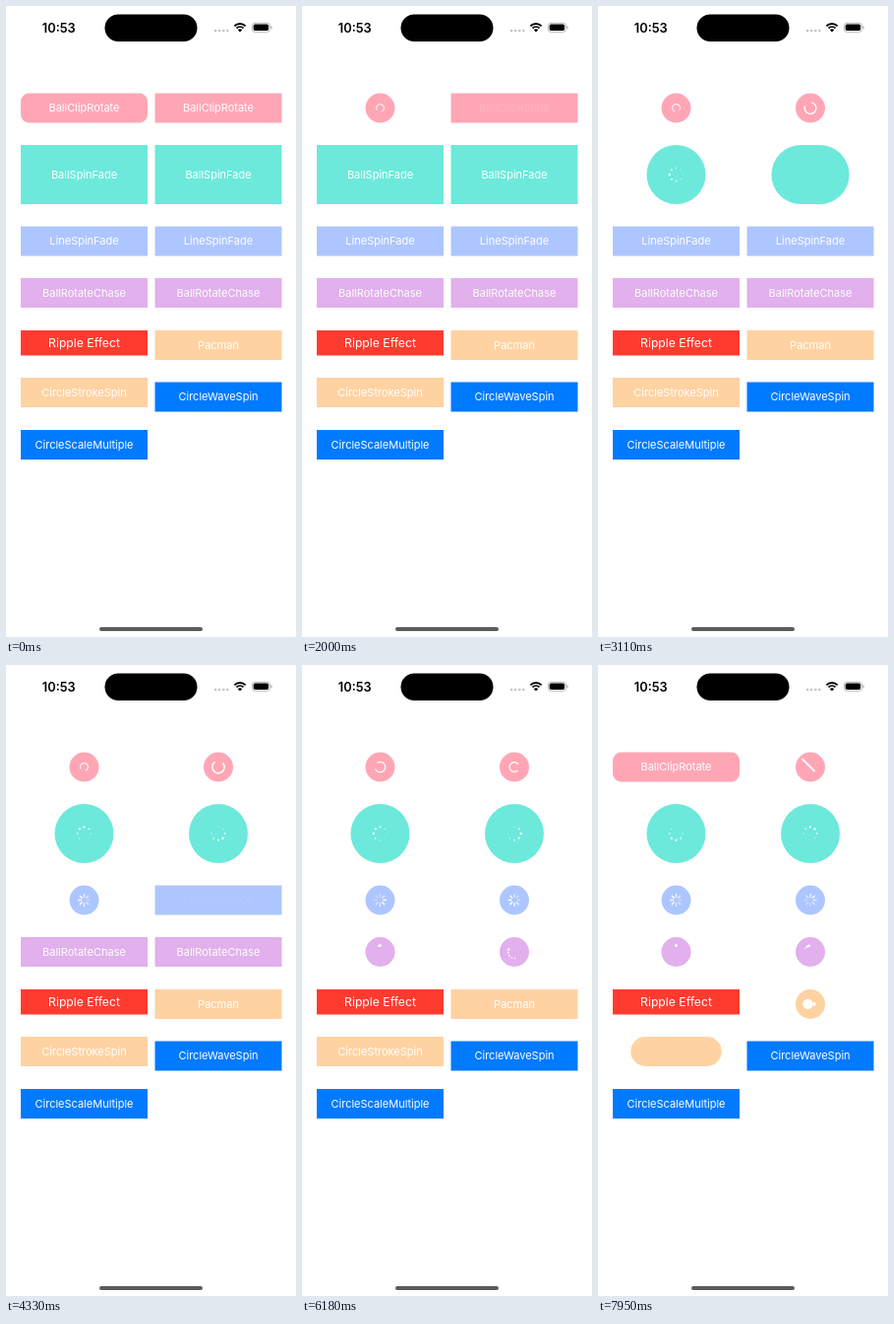
These frames come from a looping animation (295 by 640 pixels, 8000 ms). An HTML page with a canvas:

```html
<!DOCTYPE html>
<html lang="en">
<head>
<meta charset="utf-8">
<style>
html, body { margin: 0; width: 100%; height: 100%; overflow: hidden; background: #fff; }
canvas { display: block; width: 295px; height: 640px; }
</style>
</head>
<body>
<canvas id="stage"></canvas>
<script>
const W = 295, H = 640, LOOP = 8000;
const FIRST_CHANGE = 1450, STEP = 110.2;
const FADE = 100, SHRINK = 150;
const LEFT = 15, RIGHT = 151.5, BUTTON_W = 129;
const PINK = '#ffa6b5', TEAL = '#6ce9db', LILAC = '#adc6ff', PURPLE = '#e1b0ed';
const RED = '#ff3b30', PEACH = '#ffd2a2', BLUE = '#007aff';
const TAU = Math.PI * 2;

const canvas = document.getElementById('stage');
const ctx = canvas.getContext('2d');
const dpr = window.devicePixelRatio || 1;
canvas.width = W * dpr;
canvas.height = H * dpr;

const clamp = v => Math.max(0, Math.min(1, v));
const lerp = (a, b, k) => a + (b - a) * k;
const fract = v => v - Math.floor(v);
const smooth = k => k * k * (3 - 2 * k);
// 1 at both ends of a cycle, 0 in the middle
const valley = phase => Math.abs(1 - 2 * fract(phase));

function bezierEase(x1, y1, x2, y2, x) {
  const curve = (a, b, s) => 3 * a * s * (1 - s) ** 2 + 3 * b * s * s * (1 - s) + s ** 3;
  let lo = 0, hi = 1;
  for (let i = 0; i < 20; i++) {
    const mid = (lo + hi) / 2;
    if (curve(x1, x2, mid) < x) lo = mid; else hi = mid;
  }
  return curve(y1, y2, lo);
}

function disc(x, y, r) {
  ctx.beginPath();
  ctx.arc(x, y, r, 0, TAU);
  ctx.fill();
}

function box(x, y, w, h, r, color) {
  ctx.fillStyle = color;
  ctx.beginPath();
  ctx.roundRect(x, y, w, h, r);
  ctx.fill();
}

// Spinners draw in white around the origin; t is ms since their cycle began.
function clipRotate(t) {
  const phase = fract(t / 577);
  const scale = lerp(0.58, 1, valley(phase));
  ctx.rotate(phase * TAU);
  ctx.lineWidth = 1.5 * scale;
  ctx.beginPath();
  ctx.arc(0, 0, 6.3 * scale, -Math.PI / 4, Math.PI * 1.25);
  ctx.stroke();
}

function spinFade(t) {
  for (let i = 0; i < 8; i++) {
    const k = valley(t / 1000 - i * 0.12);
    const a = i * TAU / 8;
    ctx.globalAlpha = lerp(0.3, 1, k);
    disc(6.7 * Math.cos(a), 6.7 * Math.sin(a), lerp(0.5, 1.25, k));
  }
}

function lineFade(t) {
  ctx.lineWidth = 1.5;
  for (let i = 0; i < 8; i++) {
    const a = i * TAU / 8, c = Math.cos(a), s = Math.sin(a);
    ctx.globalAlpha = lerp(0.3, 1, smooth(valley(t / 1200 - (i + 1) * 0.1)));
    ctx.beginPath();
    ctx.moveTo(3.2 * c, 3.2 * s);
    ctx.lineTo(5.8 * c, 5.8 * s);
    ctx.stroke();
  }
}

function rotateChase(t) {
  const phase = fract(t / 1500);
  for (let i = 0; i < 5; i++) {
    const rate = i / 5;
    const k = bezierEase(0.5, 0.15 + rate, 0.25, 1, phase);
    const a = k * TAU - Math.PI / 2;
    disc(6.3 * Math.cos(a), 6.3 * Math.sin(a), 1.4 * lerp(1 - rate, 0.2 + rate, k));
  }
}

function pacman(t) {
  const mouth = valley(t / 500) * Math.PI / 4;
  const travel = fract(t / 1000);
  ctx.beginPath();
  ctx.moveTo(-2.6, 0);
  ctx.arc(-2.6, 0, 5, mouth, TAU - mouth);
  ctx.fill();
  ctx.globalAlpha = lerp(1, 0.7, travel);
  disc(lerp(6, -2.6, travel), 0, 1.9);
}

function cross(t) {
  const stroke = (from, k) => {
    if (k <= 0) return;
    ctx.beginPath();
    ctx.moveTo(from, -8);
    ctx.lineTo(lerp(from, -from, k), lerp(-8, 8, k));
    ctx.stroke();
  };
  ctx.lineWidth = 1.8;
  stroke(-8, clamp(t / 230));
  stroke(8, clamp(t / 230 - 1));
}

const buttons = [
  { label: 'BallClipRotate', x: LEFT, y: 88.5, color: PINK, radius: 8.5, tap: 1420, spinner: clipRotate, origin: 1689, reopen: 7170 },
  { label: 'BallClipRotate', x: RIGHT, y: 88.5, color: PINK, tap: 1915, spinner: clipRotate, origin: 2573, fail: 7780 },
  { label: 'BallSpinFade', x: LEFT, y: 141, h: 60, color: TEAL, tap: 2400, spinner: spinFade, origin: 2650 },
  { label: 'BallSpinFade', x: RIGHT, y: 141, h: 60, color: TEAL, tap: 2905, spinner: spinFade, origin: 3155 },
  { label: 'LineSpinFade', x: LEFT, y: 223.5, color: LILAC, tap: 3450, spinner: lineFade, origin: 3700 },
  { label: 'LineSpinFade', x: RIGHT, y: 223.5, color: LILAC, tap: 4225, spinner: lineFade, origin: 4475 },
  { label: 'BallRotateChase', x: LEFT, y: 276, color: PURPLE, tap: 4930, spinner: rotateChase, origin: 5105 },
  { label: 'BallRotateChase', x: RIGHT, y: 276, color: PURPLE, tap: 5450, spinner: rotateChase, origin: 5620 },
  { label: 'Ripple Effect', x: LEFT, y: 329, h: 25.5, color: RED, size: 12.2 },
  { label: 'Pacman', x: RIGHT, y: 329, color: PEACH, tap: 6300, spinner: pacman, origin: 5690 },
  { label: 'CircleStrokeSpin', x: LEFT, y: 377, color: PEACH, tap: 7790 },
  { label: 'CircleWaveSpin', x: RIGHT, y: 381.5, color: BLUE },
  { label: 'CircleScaleMultiple', x: LEFT, y: 430, color: BLUE }
];

function drawButton(b, t) {
  const { h = 30, radius = 0, size = 11, tap = Infinity, reopen = Infinity, fail = Infinity } = b;
  const reopened = clamp((t - reopen) / SHRINK);
  const shrunk = smooth(clamp((t - tap - FADE) / SHRINK)) * (1 - smooth(reopened));
  const labelAlpha = t >= reopen ? clamp((t - reopen - SHRINK) / FADE) : clamp(1 - (t - tap) / FADE);
  const rounded = t >= tap + FADE && reopened < 1;
  const w = lerp(BUTTON_W, h, shrunk);
  const cx = b.x + BUTTON_W / 2, cy = b.y + h / 2;

  box(cx - w / 2, b.y, w, h, rounded ? h / 2 : radius, b.color);
  ctx.save();
  ctx.translate(cx, cy);
  ctx.fillStyle = ctx.strokeStyle = '#fff';
  ctx.lineCap = 'round';
  if (shrunk === 1) {
    if (t >= fail) cross(t - fail);
    else if (b.spinner) b.spinner(t - b.origin);
  } else {
    ctx.globalAlpha = labelAlpha;
    ctx.font = `${size}px Inter, sans-serif`;
    ctx.textAlign = 'center';
    ctx.fillText(b.label, 0, size * 0.36);
  }
  ctx.restore();
}

function drawStatusBar() {
  ctx.fillStyle = '#000';
  ctx.font = '600 12.8px Inter, sans-serif';
  ctx.textAlign = 'center';
  ctx.fillText('10:53', 53.8, 26.6);
  box(100.5, 8.5, 94, 27.5, 13.75, '#000');

  ctx.fillStyle = '#c4c4c6';
  for (let i = 0; i < 4; i++) disc(213 + i * 4.1, 25, 1.3);

  ctx.save();
  ctx.fillStyle = ctx.strokeStyle = '#000';
  ctx.lineWidth = 1.9;
  for (const r of [8, 4.9]) {
    ctx.beginPath();
    ctx.arc(238, 26, r, -Math.PI * 0.75, -Math.PI * 0.25);
    ctx.stroke();
  }
  ctx.beginPath();
  ctx.moveTo(238, 26.4);
  ctx.arc(238, 26.4, 3, -Math.PI * 0.75, -Math.PI * 0.25);
  ctx.fill();
  ctx.strokeStyle = '#a5a5a5';
  ctx.lineWidth = 0.8;
  ctx.beginPath();
  ctx.roundRect(250.4, 17.3, 18, 9, 2.8);
  ctx.stroke();
  ctx.restore();
  box(251.7, 18.6, 15.4, 6.4, 1.7, '#000');
  box(269.4, 20.3, 1.1, 3, 0.5, '#a5a5a5');
}

function draw(now) {
  const elapsed = now % LOOP;
  const step = Math.floor((elapsed - FIRST_CHANGE + 25) / STEP);
  const t = elapsed < FIRST_CHANGE ? 0 : FIRST_CHANGE + step * STEP;
  ctx.setTransform(dpr, 0, 0, dpr, 0, 0);
  ctx.fillStyle = '#fff';
  ctx.fillRect(0, 0, W, H);
  drawStatusBar();
  for (const b of buttons) drawButton(b, t);
  box(95, 630, 105, 4, 2, '#5c5c5c');
}

const start = performance.now();
function tick() {
  draw(performance.now() - start);
  requestAnimationFrame(tick);
}
tick();
</script>
</body>
</html>
```
